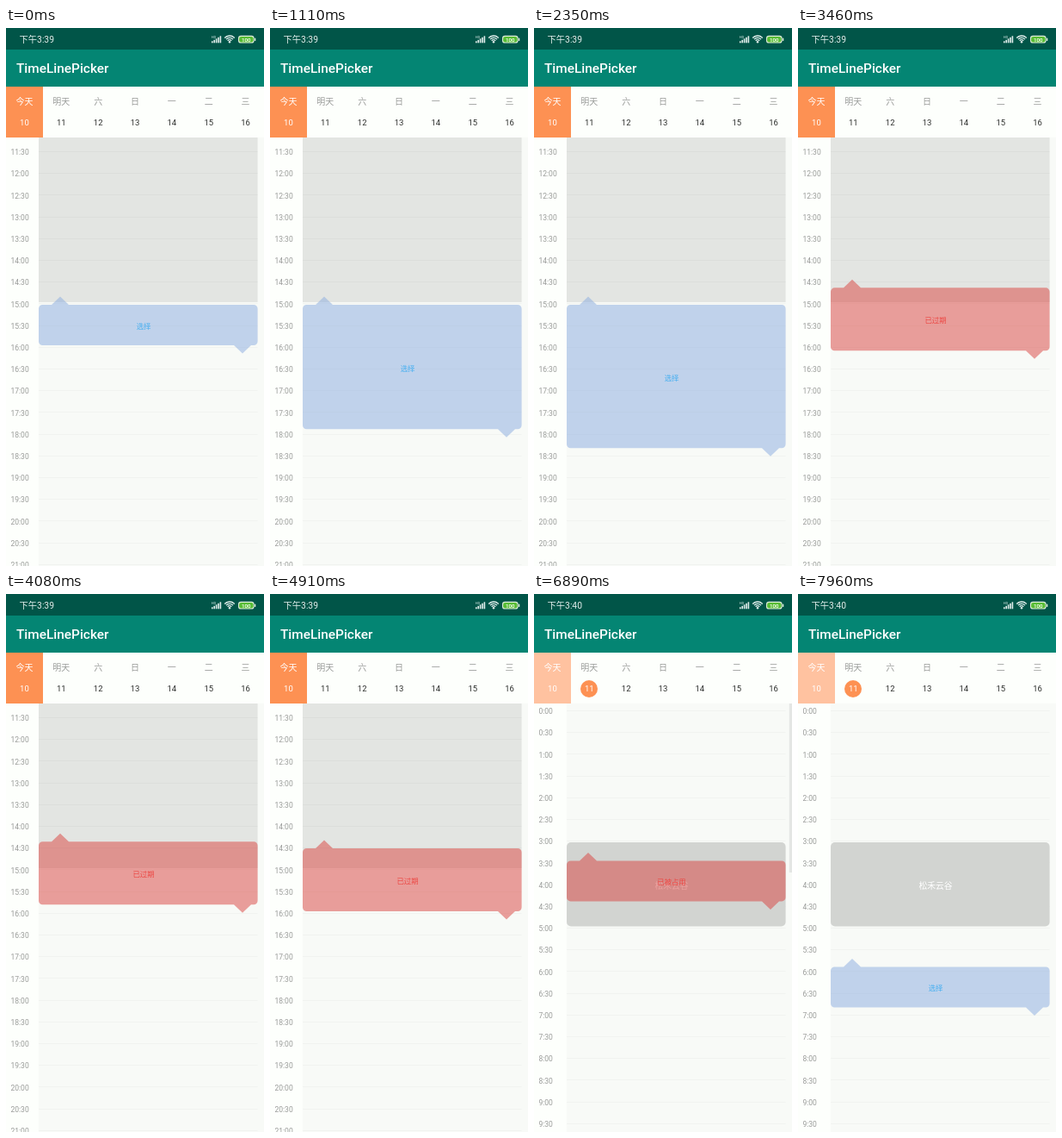
Animation of 300x624 px, one loop 8000 ms. Source, as an HTML page with a canvas:

```html
<!DOCTYPE html>
<html lang="zh">
<head>
<meta charset="utf-8">
<title>TimeLinePicker</title>
<style>
  html, body { margin: 0; width: 100%; height: 100%; overflow: hidden; background: #fdfffc; }
  canvas { display: block; width: 300px; height: 624px; }
</style>
</head>
<body>
<canvas id="stage"></canvas>
<script>
const W = 300, H = 624, LOOP = 8000;
const SWITCH = 5420, APPEAR = 5900, MINUTE = 6720;
const BODY = 127, LEFT = 38, RIGHT = 292.6, STEP = 25.2;
const FONT = 'Roboto, "Noto Sans CJK SC", "Noto Sans CJK", sans-serif';
const ORANGE = '#fd9153';
const BOOKED = { top: 288, bottom: 385.5, name: '松禾云谷' };
const DAYS = ['今天', '明天', '六', '日', '一', '二', '三'];

// [time, y] keys for the two edges of the selection
const TODAY_TOP = [[0, 321], [3300, 321], [3460, 301.5], [3800, 248], [4200, 303],
  [4330, 309], [4800, 295], [5420, 295]];
const TODAY_BOTTOM = [[0, 368], [850, 368], [1260, 507], [1560, 488.5], [1660, 488.5],
  [2010, 530], [2350, 487.5], [2470, 437.5], [2900, 400], [3200, 394], [3300, 394]];
const NEXT_TOP = [[5900, 136], [6150, 136], [6550, 162], [6690, 163], [6890, 309],
  [7200, 393], [7500, 421], [7800, 432.5], [8000, 432.5]];

const canvas = document.getElementById('stage');
const c = canvas.getContext('2d');
const dpr = window.devicePixelRatio || 1;
canvas.width = W * dpr;
canvas.height = H * dpr;

// Monotone cubic through the keys: no overshoot, rests at turning points
function along(keys, t) {
  const last = keys.length - 1;
  if (t <= keys[0][0]) return keys[0][1];
  if (t >= keys[last][0]) return keys[last][1];
  let i = 0;
  while (t >= keys[i + 1][0]) i++;
  const rate = k => (keys[k + 1][1] - keys[k][1]) / (keys[k + 1][0] - keys[k][0]);
  const slope = k => {
    if (k === 0 || k === last) return 0;
    const a = rate(k - 1), b = rate(k);
    return a * b > 0 ? 2 * a * b / (a + b) : 0;
  };
  const [t0, y0] = keys[i], [t1, y1] = keys[i + 1];
  const d = t1 - t0, u = (t - t0) / d, v = 1 - u;
  return y0 * (1 + 2 * u) * v * v + y1 * u * u * (3 - 2 * u)
    + d * (slope(i) * u * v * v - slope(i + 1) * u * u * v);
}

function box(x, y, w, h, color) {
  c.fillStyle = color;
  c.fillRect(x, y, w, h);
}

function roundBox(x, y, w, h, r, color) {
  c.beginPath();
  c.roundRect(x, y, w, h, r);
  c.fillStyle = color;
  c.fill();
}

function disc(x, y, r, color) {
  c.beginPath();
  c.arc(x, y, r, 0, 7);
  c.fillStyle = color;
  c.fill();
}

function text(str, x, y, size, color, align = 'center', weight = 400) {
  c.font = `${weight} ${size}px ${FONT}`;
  c.textAlign = align;
  c.fillStyle = color;
  c.fillText(str, x, y);
}

function statusBar(t) {
  box(0, 0, W, 25, '#015548');
  text('下午' + (t < MINUTE ? '3:39' : '3:40'), 15.5, 17.3, 10.3, '#e4efed', 'left');
  text('HD', 241.5, 12, 4, '#dcebe8');
  for (let i = 0; i < 5; i++) {
    const h = 2 + i * 1.5;
    box(239 + i * 2.4, 17.3 - h, 1.6, h, '#e4efed');
  }
  c.strokeStyle = '#e4efed';
  c.lineWidth = 1.3;
  for (const r of [3.2, 5.6, 8]) {
    c.beginPath();
    c.arc(260, 17, r, -Math.PI * 0.76, -Math.PI * 0.24);
    c.stroke();
  }
  disc(260, 16.2, 1.2, '#e4efed');
  roundBox(270, 8.8, 18.6, 8.8, 3.2, '#dcecd8');
  roundBox(271.1, 9.9, 16.4, 6.6, 2.3, '#58bd35');
  roundBox(289, 11.4, 1.3, 3.6, 0.6, '#dcecd8');
  text('100', 279.3, 15.5, 6.2, '#fff', 'center', 500);
}

function header(next) {
  box(0, 25, W, 43, '#048573');
  text('TimeLinePicker', 12, 52.3, 15.4, '#fff', 'left', 500);
  box(0, 68, W, BODY - 68, '#fdfffc');
  box(0, 68, 43, BODY - 68, next ? '#ffc2a0' : ORANGE);
  if (next) disc(64, 110, 10, ORANGE);
  DAYS.forEach((day, i) => {
    const x = (i + 0.5) * W / 7;
    text(day, x, 88.8, 10, i ? '#999b99' : '#fff');
    text(10 + i, x, 113.4, 9.5, !i || (next && i === 1) ? '#fff' : '#2b2d2b');
  });
}

function timeline(next) {
  box(0, BODY, LEFT, H, '#fdfffc');
  box(LEFT, BODY, W - LEFT, H, '#f8faf7');
  const first = next ? 0 : 23, y0 = next ? 136 : 144;
  for (let i = 0; i < 20; i++) {
    const y = y0 + i * STEP, slot = first + i;
    const label = Math.floor(slot / 2) + (slot % 2 ? ':30' : ':00');
    box(LEFT, Math.round(y - 1), RIGHT - LEFT, 1, '#f1f3f0');
    text(label, 5.5, y + 3.1, 8.5, '#989a98', 'left');
  }
  if (next) {
    roundBox(LEFT, BOOKED.top, RIGHT - LEFT, BOOKED.bottom - BOOKED.top, 5, '#d2d4d1');
    text(BOOKED.name, 160, 341.7, 9.8, '#fff');
  } else {
    box(LEFT, BODY, RIGHT - LEFT, 318 - BODY, 'rgba(0,0,0,.085)');
  }
}

function selection(top, bottom, warning) {
  c.beginPath();
  c.roundRect(LEFT, top, RIGHT - LEFT, bottom - top, 4.5);
  c.moveTo(53, top);
  c.lineTo(63, top - 9.5);
  c.lineTo(73, top);
  c.closePath();
  c.moveTo(265, bottom);
  c.lineTo(285, bottom);
  c.lineTo(275, bottom + 9.5);
  c.closePath();
  c.fillStyle = warning ? 'rgba(218,66,63,.5)' : 'rgba(138,172,223,.5)';
  c.fill();
  text(warning || '选择', 160, (top + bottom) / 2 + 4.4, 8.4, warning ? '#ec4743' : '#46aff0');
}

function draw(t) {
  const next = t >= SWITCH;
  c.setTransform(dpr, 0, 0, dpr, 0, 0);
  box(0, 0, W, H, '#fdfffc');
  c.save();
  c.beginPath();
  c.rect(0, BODY, W, H - BODY);
  c.clip();
  timeline(next);
  if (!next) {
    const top = along(TODAY_TOP, t);
    const bottom = along(TODAY_BOTTOM, t) + top - 321;
    selection(top, bottom, top < 318 ? '已过期' : '');
  } else if (t >= APPEAR) {
    const top = along(NEXT_TOP, t), bottom = top + 47;
    const clash = bottom > BOOKED.top && top < BOOKED.bottom;
    selection(top, bottom, clash ? '已被占用' : '');
  }
  if (next) {
    c.globalAlpha = Math.max(0, Math.min(1, (7300 - t) / 250));
    box(296.8, BODY, 3.2, 196, '#e4e6e4');
  }
  c.restore();
  header(next);
  statusBar(t);
}

const start = performance.now();
function tick() {
  draw((performance.now() - start) % LOOP);
  requestAnimationFrame(tick);
}
tick();
</script>
</body>
</html>
```
